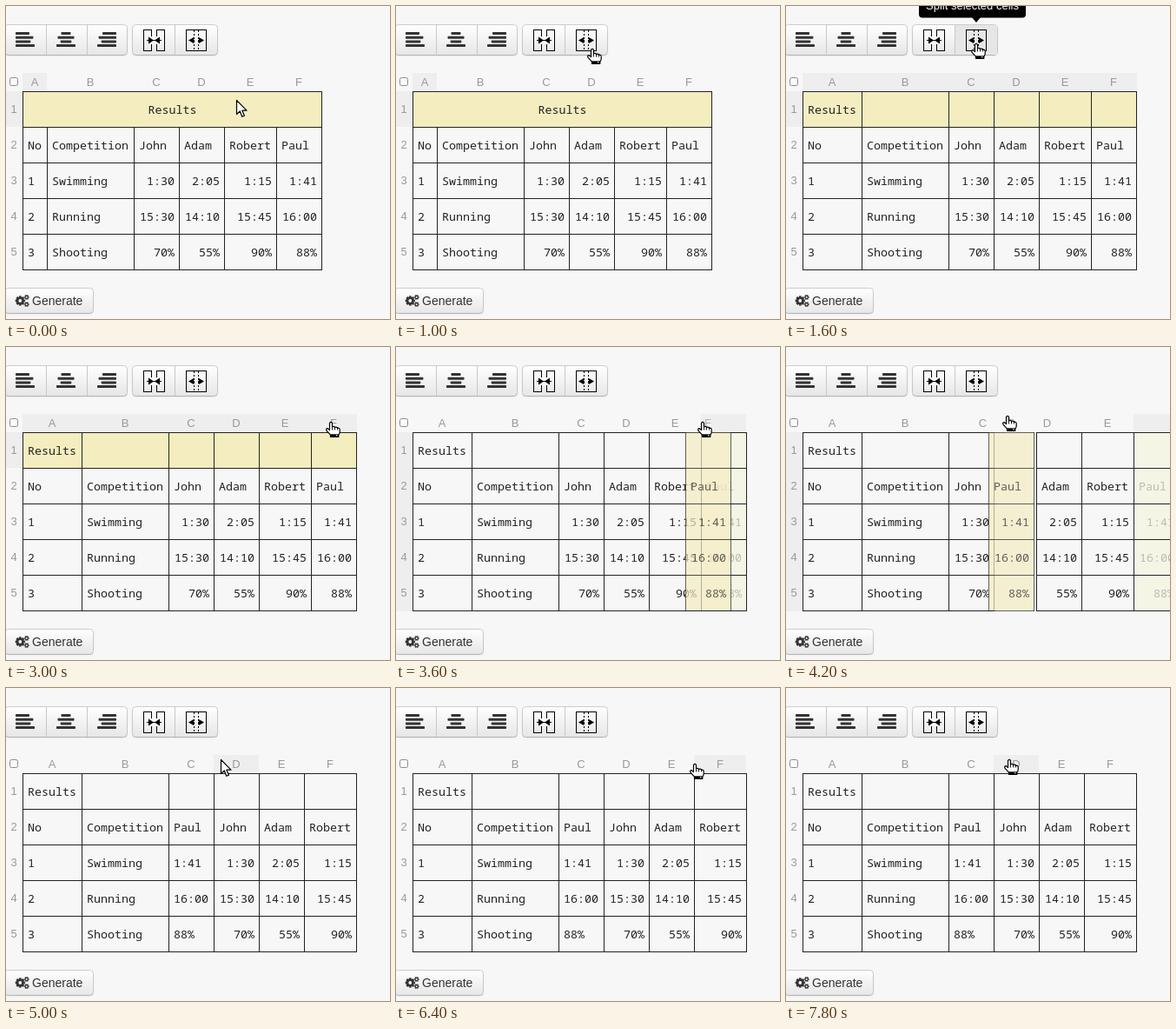
Write an HTML page with a canvas that moves like this. It is 442 by 360 pixels and loops after 8 s.

```html
<!DOCTYPE html>
<html lang="en">
<head>
<meta charset="utf-8">
<title>Table editor</title>
<style>
html, body { margin: 0; width: 100%; height: 100%; overflow: hidden; background: #f7f7f7; }
canvas { display: block; }
</style>
</head>
<body>
<canvas id="stage" width="442" height="360"></canvas>
<script>
const ctx = document.getElementById('stage').getContext('2d');
const LOOP = 8000, TICK = 200;
const TOP = 98, ROW = 41, HEAD = 77;
const SANS = '"Liberation Sans", Arial, sans-serif';
const MONO = '13.333px "Noto Sans Mono", monospace';
const INK = '#222', YELLOW = '#f3edbf', SHADE = '#eeeeee', PAGE = '#f7f7f7';

const number = ['No', '1', '2', '3'];
const events = ['Competition', 'Swimming', 'Running', 'Shooting'];
const john = ['John', '1:30', '15:30', '70%'];
const adam = ['Adam', '2:05', '14:10', '55%'];
const robert = ['Robert', '1:15', '15:45', '90%'];
const paul = ['Paul', '1:41', '16:00', '88%'];
const before = [number, events, john, adam, robert, paul];
const after = [number, events, paul, john, adam, robert];

// Time marks of the story
const TIP_ON = 1200, SPLIT = 1400, TIP_OFF = 1800, GRAB = 3400, DROP = 4800;
const GAP = 49;

// time, x, y, hand (1) or arrow (0)
const cursorPath = [
  [0, 265, 108, 0], [200, 270, 107, 0], [400, 271, 98, 0], [600, 260, 79, 0],
  [800, 243, 62, 0], [1000, 226, 49, 1], [1200, 220, 43, 1], [1600, 219, 43, 1],
  [1800, 229, 50, 0], [2000, 270, 62, 0], [2200, 328, 79, 0], [2400, 368, 86, 1],
  [3000, 374, 86, 1], [3400, 369, 86, 1], [3600, 353, 86, 1], [4200, 255, 79, 1],
  [4600, 205, 80, 1], [4800, 214, 81, 1], [5000, 247, 82, 0], [5200, 263, 82, 1],
  [6000, 308, 83, 1], [6600, 362, 89, 1], [7200, 308, 88, 1], [7800, 257, 82, 1]
];
const ghostPath = [[3400, 347], [3600, 333], [4200, 233], [4600, 183]];

function sample(path, t) {
  const i = path.findIndex(k => k[0] > t);
  if (i < 0) return path[path.length - 1];
  if (i === 0) return path[0];
  const a = path[i - 1], b = path[i], p = (t - a[0]) / (b[0] - a[0]);
  return a.map((v, n) => n === 3 ? v : Math.round(v + (b[n] - v) * p));
}

function fill(color, x, y, w, h) {
  ctx.fillStyle = color;
  ctx.fillRect(x, y, w, h);
}

function label(str, x, y, font, color, align = 'left') {
  ctx.font = font;
  ctx.fillStyle = color;
  ctx.textAlign = align;
  ctx.fillText(str, x, y);
}

function triangle(x1, y1, x2, y2, x3, y3) {
  ctx.fillStyle = '#000';
  ctx.beginPath();
  ctx.moveTo(x1, y1);
  ctx.lineTo(x2, y2);
  ctx.lineTo(x3, y3);
  ctx.fill();
}

function button(x, y, w, h) {
  const face = ctx.createLinearGradient(0, y, 0, y + h);
  face.addColorStop(0, '#ffffff');
  face.addColorStop(1, '#e6e6e6');
  const edge = ctx.createLinearGradient(0, y, 0, y + h);
  edge.addColorStop(0, '#cccccc');
  edge.addColorStop(0.9, '#c4c4c4');
  edge.addColorStop(1, '#b0b0b0');
  ctx.beginPath();
  ctx.roundRect(x + 0.5, y + 0.5, w - 1, h - 1, 4);
  ctx.fillStyle = face;
  ctx.strokeStyle = edge;
  ctx.lineWidth = 1;
  ctx.save();
  ctx.shadowColor = 'rgba(0,0,0,0.07)';
  ctx.shadowBlur = 2;
  ctx.shadowOffsetY = 1;
  ctx.fill();
  ctx.restore();
  ctx.stroke();
}

// side: 0 left, 0.5 centre, 1 right
function alignIcon(x, widths, side) {
  widths.forEach((w, i) => {
    ctx.fillStyle = '#333';
    ctx.beginPath();
    ctx.roundRect(x + (22 - w) * side, 30 + i * 4.7, w, 3, 0.8);
    ctx.fill();
  });
}

function mergeIcon(x, y) {
  ctx.strokeStyle = '#000';
  ctx.strokeRect(x + 0.5, y + 0.5, 9, 24);
  ctx.strokeRect(x + 15.5, y + 0.5, 9, 24);
  fill(PAGE, x + 9, y + 8, 7, 9);
  fill('#000', x + 4, y + 12, 17, 1);
  triangle(x + 6, y + 8.5, x + 12, y + 12.5, x + 6, y + 16.5);
  triangle(x + 19, y + 8.5, x + 13, y + 12.5, x + 19, y + 16.5);
}

function splitIcon(x, y) {
  ctx.strokeStyle = '#000';
  ctx.strokeRect(x + 0.5, y + 0.5, 23, 24);
  ctx.setLineDash([2, 2]);
  for (const lx of [9.5, 14.5]) {
    ctx.beginPath();
    ctx.moveTo(x + lx, y + 1);
    ctx.lineTo(x + lx, y + 24);
    ctx.stroke();
  }
  ctx.setLineDash([]);
  fill('#000', x + 5, y + 12, 5, 1);
  fill('#000', x + 14, y + 12, 5, 1);
  triangle(x + 9, y + 9, x + 3, y + 12.5, x + 9, y + 16);
  triangle(x + 15, y + 9, x + 21, y + 12.5, x + 15, y + 16);
}

function gear(x, y, r, teeth) {
  ctx.strokeStyle = ctx.fillStyle = '#333';
  ctx.lineWidth = r * 0.48;
  ctx.beginPath();
  ctx.arc(x, y, r * 0.58, 0, Math.PI * 2);
  ctx.stroke();
  for (let i = 0; i < teeth; i++) {
    const a = i / teeth * Math.PI * 2, c = Math.cos(a), s = Math.sin(a);
    ctx.beginPath();
    ctx.moveTo(x + c * r * 0.7, y + s * r * 0.7);
    ctx.lineTo(x + c * r, y + s * r);
    ctx.stroke();
  }
  ctx.lineWidth = 1;
}

function toolbar(hover) {
  button(-2, 21, 142, 36);
  button(145, 21, 99, 36);
  if (hover) fill('#e6e6e6', 195, 22, 48, 34);
  for (const x of [46, 93, 194]) fill('#c8c8c8', x, 22, 1, 34);
  alignIcon(11, [16, 20.4, 17.3, 22], 0);
  alignIcon(58, [11, 19, 12.6, 22], 0.5);
  alignIcon(105, [16, 20.4, 17.3, 22], 1);
  mergeIcon(158, 27);
  splitIcon(207, 27);

  button(-2, 324, 103, 30);
  gear(16.3, 339, 5.6, 8);
  gear(23.7, 335, 2.9, 6);
  gear(23.7, 343.2, 2.9, 6);
  label('Generate', 30, 344, '14px ' + SANS, '#333');

  ctx.beginPath();
  ctx.roundRect(4.5, 82.5, 9, 9, 2);
  ctx.fillStyle = '#fbfbfb';
  ctx.strokeStyle = '#8a8a8a';
  ctx.fill();
  ctx.stroke();
}

function tooltip() {
  ctx.fillStyle = '#000';
  ctx.beginPath();
  ctx.roundRect(153, -12, 123, 25.5, 4);
  ctx.fill();
  triangle(214, 13, 224, 13, 219, 19);
  label('Split selected cells', 161, 4, '13px ' + SANS, '#fff');
}

function letter(str, x) {
  label(str, x, 92, '13px ' + SANS, '#999', 'center');
}

function column(cells, x, w, { leftAlign = false, bg = null, textAlpha = 1 } = {}) {
  if (bg) fill(bg, x, TOP, w, ROW * 5);
  for (let r = 0; r < 6; r++) fill(INK, x, TOP + r * ROW, w + 1, 1);
  fill(INK, x, TOP, 1, ROW * 5 + 1);
  fill(INK, x + w, TOP, 1, ROW * 5 + 1);
  const alpha = ctx.globalAlpha;
  ctx.globalAlpha = alpha * textAlpha;
  cells.forEach((str, r) => {
    const y = TOP + ROW * (r + 1) + 26;
    if (r === 0 || leftAlign) label(str, x + 6, y, MONO, INK);
    else label(str, x + w - 5, y, MONO, INK, 'right');
  });
  ctx.globalAlpha = alpha;
}

function table(t, pointerX) {
  const split = t >= SPLIT, drag = t >= GRAB && t < DROP, done = t >= DROP;
  const cols = done ? after : before;
  const widths = [split ? 68 : 28, 100, 52, 52, 60, 52];
  if (done) widths.splice(4, 2, 52, 60);
  const lefts = widths.map((w, i) => widths.slice(0, i).reduce((a, b) => a + b, 19));
  const ghostX = sample(ghostPath, t)[1];
  let slot = 5;
  if (drag) {
    slot = lefts.findIndex((x, i) => x + widths[i] / 2 > ghostX);
    if (slot < 0) slot = 5;
  }
  const open = drag && slot < 5;

  // Shaded headings
  if (drag) fill(SHADE, 0, TOP, 19, ROW * 5 + 1);
  else if (!done) fill(SHADE, 0, TOP, 19, ROW);
  if (!split) fill(SHADE, 19, HEAD, 28, 21);
  else if (!drag && !done) fill(SHADE, 19, HEAD, 385, 21);
  for (let r = 0; r < 5; r++) {
    label(String(r + 1), 9, TOP + ROW * r + 25, '13px ' + SANS, '#999', 'center');
  }
  if (split && !drag && !done) fill(YELLOW, 19, TOP, 384, ROW);

  cols.forEach((cells, i) => {
    const w = widths[i], x = lefts[i] + (open && i >= slot ? GAP : 0);
    const held = drag && i === 5;
    const hovered = done && pointerX >= x && pointerX < x + w;
    if (held || hovered) fill(SHADE, x, HEAD, w, 21);
    if (!held) {
      const nudge = !open ? 0 : i === slot ? -13.5 : i === slot - 1 ? 13.5 : 0;
      letter('ABCDEF'[i], x + w / 2 + nudge, 92);
    }
    column(cells, x, w, {
      leftAlign: i < 2 || (done && i === 2),
      bg: held ? '#f5f5e6' : null,
      textAlpha: held ? 0.27 : 1
    });
  });

  if (split) {
    label('Results', 25, TOP + 26, MONO, INK);
  } else {
    fill(YELLOW, 20, TOP + 1, 343, ROW - 1);
    label('Results', 191.5, TOP + 26, MONO, INK, 'center');
  }

  if (drag) {
    ctx.globalAlpha = 0.7;
    letter('F', ghostX + 26);
    column(paul, ghostX, 52, { bg: '#f6edc4' });
    ctx.globalAlpha = 1;
  }
}

const arrowShape = new Path2D('M.5 .5V16.5L4.3 13 6.8 19.3 9.4 18.2 6.9 12.2H12Z');
const handShape = new Path2D('M-1.5 1.5Q0-.8 1.5 1.5V5.8Q3.4 4.8 4.5 6.4Q6.4 5.6 7.5 7.2' +
  'Q10.2 6.8 10.2 9.4V12Q10 13.6 8.8 15V17.3H-.5V15.2L-5 10.2Q-6.2 7.6-3.6 7.7L-1.5 9.6Z');

function pointer([, x, y, hand]) {
  ctx.save();
  ctx.translate(x, y);
  ctx.lineWidth = 1.2;
  ctx.lineJoin = 'round';
  ctx.fillStyle = '#fff';
  ctx.strokeStyle = '#000';
  const shape = hand ? handShape : arrowShape;
  ctx.fill(shape);
  ctx.stroke(shape);
  if (hand) {
    for (const kx of [1.5, 4.5, 7.5]) fill('#000', kx - 0.4, 6, 0.9, 3.5);
    fill('#000', -0.5, 14.3, 9.3, 3);
    fill('#fff', 6, 15.2, 1.4, 1.2);
  }
  ctx.restore();
}

function draw(now) {
  const t = Math.floor(now % LOOP / TICK) * TICK;
  const cursor = sample(cursorPath, t);
  const overSplit = t >= TIP_ON && t < TIP_OFF;
  fill(PAGE, 0, 0, 442, 360);
  ctx.lineWidth = 1;
  toolbar(overSplit);
  table(t, cursor[1]);
  if (overSplit) tooltip();
  pointer(cursor);
}

const start = performance.now();
function loop() {
  draw(performance.now() - start);
  requestAnimationFrame(loop);
}
loop();
</script>
</body>
</html>
```
